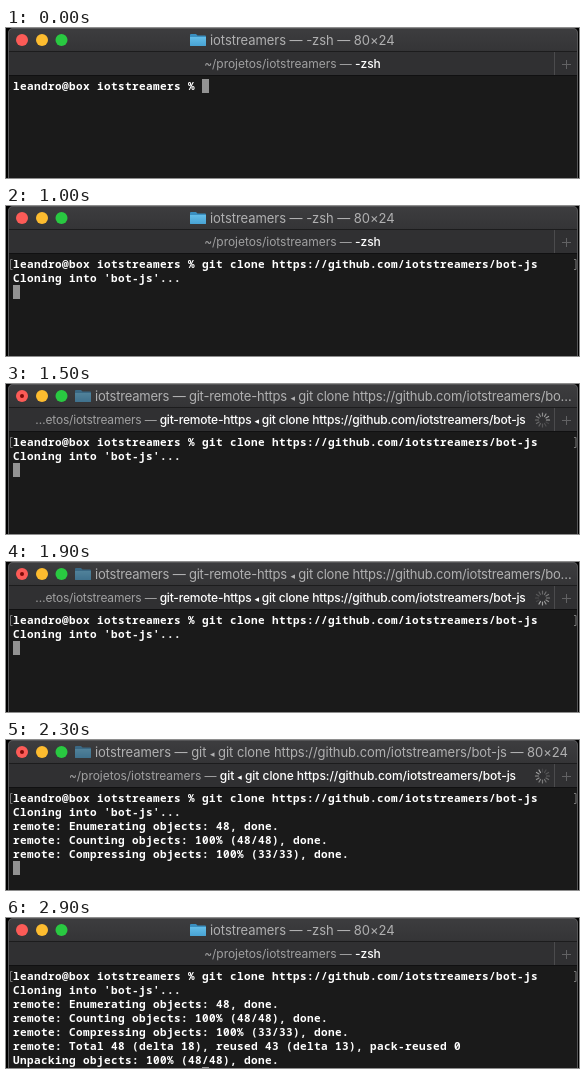
These frames come from a looping animation (573 px wide and 150 px high, 4 s). An HTML page:

```html
<!DOCTYPE html>
<html lang="en">
<head>
<meta charset="utf-8">
<title>Terminal</title>
<style>
html, body { margin: 0; width: 100%; height: 100%; overflow: hidden; background: #000; }
svg { display: block; width: 573px; height: 150px; }
text { white-space: pre; }
.ui { font-family: Inter, Roboto, sans-serif; letter-spacing: -.05px; }
.tight .ui { letter-spacing: -.2px; }
#title { font-size: 13px; fill: #b0b0b1; }
#tab { font-size: 12px; fill: #a0a0a1; }
#proc { font-weight: 500; fill: #fff; }
.arrow { font-family: "DejaVu Sans", sans-serif; font-size: 9px; }
.term { font: 700 11px "Noto Sans Mono", "DejaVu Sans Mono", monospace; letter-spacing: .4px; fill: #fff; }
#paste text { font-weight: 500; fill: #000; }
</style>
</head>
<body>
<svg id="stage" viewBox="0 0 573 150">
  <defs>
    <linearGradient id="bar" x2="0" y2="1">
      <stop offset="0" stop-color="#3d3d3f"/><stop offset="1" stop-color="#343436"/>
    </linearGradient>
    <linearGradient id="blue" x2="0" y2="1">
      <stop offset="0" stop-color="#64bde8"/><stop offset="1" stop-color="#48a2d3"/>
    </linearGradient>
    <clipPath id="frame"><rect x="2" width="570" height="170" rx="5"/></clipPath>
  </defs>
  <g clip-path="url(#frame)">
    <rect width="573" height="150" fill="#1a1a1a"/>
    <rect width="573" height="24" fill="url(#bar)"/>
    <rect y="23" width="573" height="1" fill="#1c1c1d"/>
    <rect y="24" width="573" height="23" fill="#303032"/>
    <rect y="47" width="573" height="1" fill="#101011"/>
    <rect x="548" y="24" width="1" height="23" fill="#4b4b4d"/>
  </g>
  <rect x="2.500" y=".5" width="569" height="170" rx="4.500" fill="none" stroke="#565658"/>
  <path d="M556 36.500h9M560.500 32v9" stroke="#626264"/>
  <circle cx="16" cy="12" r="6" fill="#fc5b57"/>
  <circle id="dot" cx="16" cy="12" r="2" fill="#7d0a08"/>
  <circle cx="36" cy="12" r="6" fill="#fdbc2f"/>
  <circle cx="55.500" cy="12" r="6" fill="#29c941"/>
  <g id="folder">
    <path d="M0 2q0-1 1-1h5l1.500 1.500H15q1 0 1 1V13H0z" fill="#3a8fc0"/>
    <path d="M0 4H16V12q0 1-1 1H1q-1 0-1-1z" fill="url(#blue)"/>
  </g>
  <text id="title" class="ui" y="17"></text>
  <text id="tab" class="ui" y="40" text-anchor="middle"><tspan id="path"></tspan><tspan id="proc"></tspan></text>
  <g id="spinner" stroke="#a8a8a8" stroke-width="1.200" stroke-linecap="round"></g>
  <g id="lines" class="term"></g>
  <g id="paste" class="term">
    <rect x="196" y="51" width="336" height="14" fill="#fff"/>
    <text x="196" y="62"></text>
  </g>
  <path id="marks" d="M6.500 53.500H4.500V63.500H6.500M568 53.500H570V63.500H568" fill="none" stroke="#777"/>
  <rect id="cursor" width="7" height="14" fill="#929292"/>
</svg>
<script>
const $ = id => document.getElementById(id);
const LOOP = 4000, ROW = 14, TOP = 51;
const command = 'git clone https://github.com/iotstreamers/bot-js';
const prompt = 'leandro@box iotstreamers % ';
const output = [
  prompt + command,
  "Cloning into 'bot-js'...",
  'remote: Enumerating objects: 48, done.',
  'remote: Counting objects: 100% (48/48), done.',
  'remote: Compressing objects: 100% (33/33), done.',
  'remote: Total 48 (delta 18), reused 43 (delta 13), pack-reused 0',
  'Unpacking objects: 100% (48/48), done.'
];

const home = '~/projetos/iotstreamers — ';
const remote = 'git-remote-https ◂ ' + command;
const local = 'git ◂ ' + command;
const cut = remote.slice(0, -4) + '…';
const heads = {
  idle: { x: 184, title: '-zsh — 80×24', path: home, proc: '-zsh', mid: 286.5 },
  fetch: { x: 69, title: cut, path: home, proc: remote, mid: 286.5, busy: true, tight: true },
  wait: { x: 69, title: cut, path: '…etos/iotstreamers — ', proc: remote, mid: 274.5, busy: true, tight: true, spin: true },
  git: { x: 69, title: local + ' — 80×24', path: home, proc: local, mid: 286.5, busy: true, spin: true }
};

// start time, header, visible rows (0 = fresh prompt, -1 = pasted command)
const steps = [
  [0, 'idle', 0], [700, 'idle', -1], [1000, 'idle', 2], [1100, 'fetch', 2],
  [1500, 'wait', 2], [2000, 'git', 2], [2100, 'git', 3], [2200, 'git', 4],
  [2300, 'git', 5], [2400, 'git', 6], [2500, 'idle', 7]
];

const svg = (tag, attrs, parent) => {
  const el = document.createElementNS('http://www.w3.org/2000/svg', tag);
  for (const key in attrs) el.setAttribute(key, attrs[key]);
  return parent.appendChild(el);
};
const show = (el, on) => el.style.display = on ? '' : 'none';

const rows = output.map((line, i) => {
  const el = svg('text', { x: 7, y: TOP + 11 + i * ROW }, $('lines'));
  el.textContent = line;
  return el;
});
$('paste').querySelector('text').textContent = command;
const spokes = Array.from({ length: 12 }, (_, i) =>
  svg('path', { d: 'M0-4V-7', transform: `translate(536.500 36) rotate(${i * 30})` }, $('spinner')));

// the arrow between process names is smaller than the text
function setLabel(el, label) {
  const [before, after] = label.split('◂');
  el.textContent = before;
  if (after === undefined) return;
  svg('tspan', { class: 'arrow' }, el).textContent = '◂';
  svg('tspan', {}, el).textContent = after;
}

function setHead(h) {
  $('stage').classList.toggle('tight', !!h.tight);
  $('folder').setAttribute('transform', `translate(${h.x} 5)`);
  $('folder').style.opacity = h.busy ? 0.55 : 1;
  $('title').setAttribute('x', h.x + 20);
  setLabel($('title'), 'iotstreamers — ' + h.title);
  $('tab').setAttribute('x', h.mid);
  $('path').textContent = h.path;
  setLabel($('proc'), h.proc);
  show($('dot'), h.busy);
  show($('spinner'), h.spin);
}

function setRows(n) {
  rows.forEach((el, i) => show(el, i < Math.max(n, 1)));
  rows[0].textContent = n > 0 ? output[0] : prompt;
  show($('paste'), n < 0);
  show($('marks'), n > 0);
  const x = n < 0 ? 532 : n === 0 || n === rows.length ? 196 : 7;
  $('cursor').setAttribute('x', x);
  $('cursor').setAttribute('y', TOP + Math.max(n, 0) * ROW);
}

let current;
function draw(now) {
  const t = now % LOOP;
  const step = steps.findLast(s => s[0] <= t);
  if (step !== current) {
    current = step;
    setHead(heads[step[1]]);
    setRows(step[2]);
  }
  const lead = Math.floor(t / 100);
  spokes.forEach((el, i) => el.style.opacity = 1 - .075 * ((lead - i + 48) % 12));
  requestAnimationFrame(draw);
}
draw(0);
</script>
</body>
</html>
```
